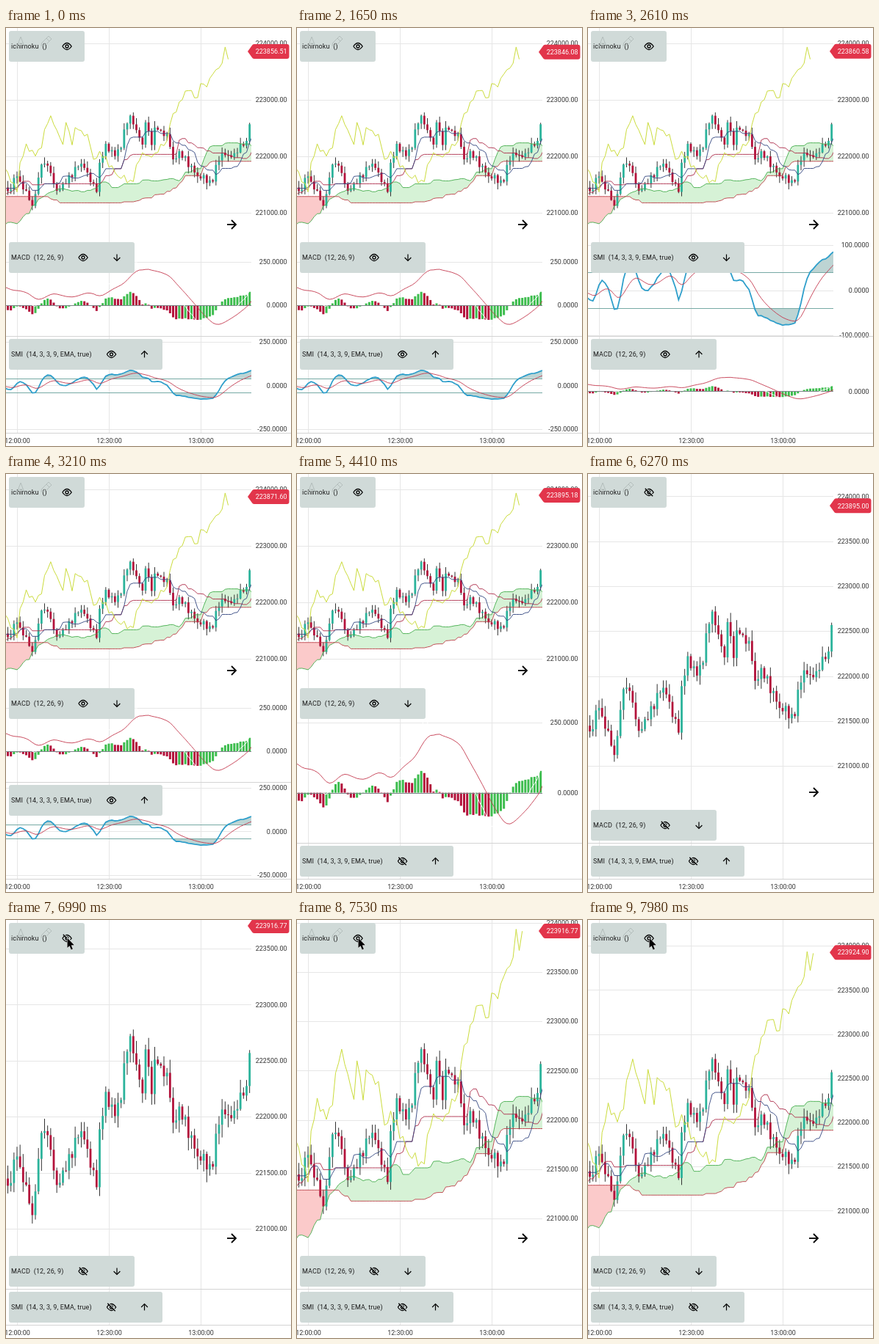
Write an HTML page with a canvas that moves like this. It is 388 px wide and 570 px high and loops after 8 s.

```html
<!DOCTYPE html>
<html lang="en">
<head>
<meta charset="utf-8">
<title>Indicator panes</title>
<style>
html, body { margin: 0; width: 100%; height: 100%; overflow: hidden; background: #fff; }
canvas { display: block; width: 388px; height: 570px; }
</style>
</head>
<body>
<canvas id="chart"></canvas>
<script>
const W = 388, H = 570, LOOP = 8000, RIGHT = 334, AXIS = 552;
const FONT = 'Roboto, "Open Sans", sans-serif';
const cv = document.getElementById('chart');
const c = cv.getContext('2d');
const dpr = window.devicePixelRatio || 1;
cv.width = W * dpr;
cv.height = H * dpr;

// ---------- market: turning points joined by a seeded zigzag ----------
const candleX = i => 2.5 + i * 25 / 6;
const FIRST = -80, LAST = 99, SHIFT = 26;
const TURNS = [
  [-80, 264], [-62, 268], [-58, 330], [-36, 497], [-24, 430], [-15, 294], [-6, 380], [-3, 330],
  [0, 362], [3, 322], [8, 402], [11, 290], [13, 293], [16, 361], [23, 296], [25, 299], [29, 364],
  [30, 285], [32, 234], [35, 267], [37, 245], [38, 195], [40, 158], [44, 236], [45, 176], [47, 237],
  [48, 190], [52, 208], [54, 276], [56, 254], [62, 322], [67, 336], [68, 291], [70, 258], [73, 270],
  [78, 226], [79, 181], [82, 121], [85, 90], [88, 109], [89, 71], [91, 80], [93, 45], [96, 16],
  [97, -28], [98, 5], [99, -25]
];
const PX = .1528;

let seed = 11;
const rnd = () => (seed = seed * 16807 % 2147483647) / 2147483647;

function makeCandles() {
  const list = [];
  let k = 0, open = 222000;
  for (let i = FIRST; i <= LAST; i++) {
    if (i > TURNS[k + 1][0]) k++;
    const [i0, y0] = TURNS[k], [i1, y1] = TURNS[k + 1];
    const jitter = i === i0 || i === i1 ? 0 : (i % 2 ? 1 : -1) * 10 * rnd();
    const y = y0 + (y1 - y0) * (i - i0) / (i1 - i0) + jitter;
    const close = 223000 - (y - 115) / PX;
    const wick = () => (2 + 16 * rnd()) / PX;
    list.push({ i, open, close, high: Math.max(open, close) + wick(), low: Math.min(open, close) - wick() });
    open = close;
  }
  return list;
}
const candles = makeCandles();
const closes = candles.map(k => k.close);
const at = (list, i) => list[Math.min(LAST, i) - FIRST];

// ---------- indicators ----------
const extent = n => candles.map((_, i) => {
  const part = candles.slice(Math.max(0, i - n + 1), i + 1);
  return [Math.max(...part.map(k => k.high)), Math.min(...part.map(k => k.low))];
});
const middle = n => extent(n).map(([hi, lo]) => (hi + lo) / 2);
const ema = (list, n) => {
  let e = list[0];
  return list.map(v => e += (v - e) * 2 / (n + 1));
};
const minus = (a, b) => a.map((v, i) => v - b[i]);
const delay = list => list.map((_, i) => list[Math.max(0, i - SHIFT)]);

const conversion = middle(9), base = middle(26);
const spanA = delay(conversion.map((v, i) => (v + base[i]) / 2));
const spanB = delay(middle(52));

const macd = minus(ema(closes, 12), ema(closes, 26));
const signal = ema(macd, 9);
const histogram = minus(macd, signal);

const smooth = list => ema(ema(list, 3), 3);
const halfRange = smooth(extent(14).map(([hi, lo]) => (hi - lo) / 2));
const smi = smooth(minus(closes, middle(14))).map((v, i) => 100 * v / halfRange[i]);
const smiSignal = ema(smi, 9);

// ---------- motion ----------
// cubic-bezier(0, 0, .58, 1)
const ease = x => {
  if (x <= 0) return 0;
  if (x >= 1) return 1;
  let lo = 0, hi = 1, s = .5;
  for (let n = 0; n < 20; n++) {
    s = (lo + hi) / 2;
    if (1.74 * s * s * (1 - s) + s ** 3 < x) lo = s; else hi = s;
  }
  return s * s * (3 - 2 * s);
};
const tween = (t, start) => ease((t - start) / 300);
const mix = (a, b, k) => a + (b - a) * k;
const mixRange = (a, b, k) => [mix(a[0], b[0], k), mix(a[1], b[1], k)];

const TICKS = [[470, 223858.93], [1345, 223846.08], [2305, 223860.58], [3025, 223874.3],
  [4105, 223895.18], [4930, 223888.4], [5890, 223895], [6690, 223916.77], [7675, 223924.9]];
const priceAt = t => TICKS.reduce((p, [start, v]) => mix(p, v, tween(t, start)), 223856.51);

const RANGE = {
  short: [224272.7, 220532.5], tall: [224293, 220522], zoom: [223755, 220784],
  macdTop: [381.4, -178], smiTop: [113.5, -102], macdLow: [820, -614], smiLow: [282, -270]
};

// ---------- drawing ----------
const pane = (y, h, [top, bot]) => ({
  y, h, top, bot, at: v => y + (top - v) / (top - bot) * h
});

function text(str, x, y, align = 'right', color = '#333', spacing = 0) {
  c.font = '9px ' + FONT;
  c.letterSpacing = spacing + 'px';
  c.textAlign = align;
  c.textBaseline = 'middle';
  c.fillStyle = color;
  c.fillText(str, x, y + .5);
}

function stroke(color, width, pts) {
  c.beginPath();
  pts.forEach(([x, y]) => c.lineTo(x, y));
  c.strokeStyle = color;
  c.lineWidth = width;
  c.stroke();
}

const rule = (y, color, x2 = W) => stroke(color, 1, [[0, Math.round(y) + .5], [x2, Math.round(y) + .5]]);

const path = (p, list, shift = 0, last = 81) => {
  const pts = [];
  for (let i = -2; i <= last; i++) pts.push([candleX(i), p.at(at(list, i + shift))]);
  return pts;
};
const series = (p, list, color, width = .9) => stroke(color, width, path(p, list));

function band(p, upper, lower, color) {
  c.beginPath();
  [...path(p, upper), ...path(p, lower).reverse()].forEach(([x, y]) => c.lineTo(x, y));
  c.fillStyle = color;
  c.fill();
}

function inPane(p, draw) {
  c.save();
  c.beginPath();
  c.rect(0, p.y, RIGHT, p.h);
  c.clip();
  draw(p);
  c.restore();
}

function scale(p, digits) {
  const unit = p.h / (p.top - p.bot);
  const step = [50, 100, 250, 500, 1000].find(s => s * unit >= 58) || 1000;
  for (let v = Math.ceil(p.bot / step) * step; v <= p.top; v += step) {
    const y = p.at(v);
    rule(y, '#e6e6e6', RIGHT);
    text(v.toFixed(digits), 382.5, y);
  }
}

function drawCandles(p) {
  candles.filter(k => k.i > -2 && k.i < 80).forEach(k => {
    const x = candleX(k.i), top = p.at(Math.max(k.open, k.close)), bot = p.at(Math.min(k.open, k.close));
    stroke('#333', 1, [[x, p.at(k.high)], [x, p.at(k.low)]]);
    c.fillStyle = k.close >= k.open ? '#2bb39b' : '#b3123b';
    c.fillRect(x - 1.4, top, 2.8, Math.max(1, bot - top));
  });
}

function drawCloud(p) {
  const high = spanA.map((v, i) => Math.max(v, spanB[i]));
  band(p, high, spanB, '#d6f2d6');
  band(p, high, spanA, '#fbcaca');
}

function drawIchimoku(p, last) {
  series(p, spanA, '#45ad4c');
  series(p, spanB, '#bd4048');
  series(p, base, '#ad2c4a');
  series(p, conversion, '#33467f');
  stroke('#cbdc3c', 1, path(p, closes, SHIFT, last));
}

function drawMacd(p) {
  const zero = p.at(0);
  for (let i = -1; i < 80; i++) {
    const v = at(histogram, i), y = p.at(v);
    c.fillStyle = v >= at(histogram, i - 1) ? '#3dbd4e' : '#b3123b';
    c.fillRect(candleX(i) - 1.5, Math.min(y, zero), 3, Math.abs(y - zero));
  }
  rule(zero, '#7d8589', RIGHT);
  series(p, macd, '#fff', 1);
  series(p, signal, '#c43a50');
}

function drawSmi(p) {
  const flat = v => smi.map(() => v);
  band(p, smi.map(v => Math.max(v, 40)), flat(40), '#bdd4d3');
  band(p, smi.map(v => Math.min(v, -40)), flat(-40), '#bdd4d3');
  [40, -40].forEach(v => rule(p.at(v), '#76a9a4', RIGHT));
  series(p, smi, '#2f9fcb', 1.8);
  series(p, smiSignal, '#c43a50');
}

function eye(x, y, hidden) {
  c.save();
  c.translate(x, y);
  c.strokeStyle = '#000';
  c.lineWidth = 1.3;
  c.beginPath();
  c.moveTo(-6.2, 0);
  c.quadraticCurveTo(0, -9, 6.2, 0);
  c.quadraticCurveTo(0, 9, -6.2, 0);
  c.stroke();
  c.beginPath();
  c.arc(0, 0, 2, 0, 7);
  c.stroke();
  if (hidden) {
    stroke('#d0dad8', 1.3, [[-4, -5.6], [6, 4.4]]);
    stroke('#000', 1.3, [[-5.2, -5.2], [5.2, 5.2]]);
  }
  c.restore();
}

function arrow(x, y, angle, r, width) {
  c.save();
  c.translate(x, y);
  c.rotate(angle);
  stroke('#000', width, [[-r, 0], [r - .5, 0]]);
  stroke('#000', width, [[0, -r], [r, 0], [0, r]]);
  c.restore();
}

function chip(y, width, label, eyeX, hidden) {
  c.fillStyle = '#d0dad8';
  c.beginPath();
  c.roundRect(4, y + 4, width, 42, 3);
  c.fill();
  text(label, 7, y + 25, 'left', '#1c1c1c', .12);
  eye(eyeX, y + 25, hidden);
}

function macdChip(y, dir, hidden) {
  chip(y, 171, 'MACD\u00a0 (12, 26, 9)', 105, hidden);
  arrow(151, y + 25, dir * Math.PI / 2, 4.4, 1.2);
}

function smiChip(y, dir, hidden) {
  chip(y, 209, 'SMI\u00a0 (14, 3, 3, 9, EMA, true)', 143.5, hidden);
  arrow(188.5, y + 25, dir * Math.PI / 2, 4.4, 1.2);
}

function faintTools() {
  const color = '#b4bebc';
  stroke(color, 1, [[15, 25], [20, 12], [25, 25]]);
  stroke(color, 1, [[17, 21], [23, 21]]);
  stroke(color, 1, [[48, 24], [49, 20], [58, 11], [62, 15], [53, 24], [48, 24]]);
  stroke(color, 1, [[55, 14], [59, 18]]);
}

function priceTag(p, price) {
  const y = Math.max(8, p.at(price));
  c.fillStyle = '#e2354b';
  c.beginPath();
  c.moveTo(329, y);
  c.lineTo(335.5, y - 9);
  c.quadraticCurveTo(336.5, y - 10, 338, y - 10);
  c.arcTo(385.5, y - 10, 385.5, y, 3);
  c.arcTo(385.5, y + 10, 338, y + 10, 3);
  c.lineTo(338, y + 10);
  c.quadraticCurveTo(336.5, y + 10, 335.5, y + 9);
  c.fill();
  text(price.toFixed(2), 382.5, y, 'right', '#fff');
}

function cursor(x, y) {
  c.beginPath();
  [[0, 0], [0, 13.5], [3, 10.8], [5.2, 16], [7.4, 15], [5.3, 10], [9.4, 9.7]]
    .forEach(([dx, dy]) => c.lineTo(x + dx, y + dy));
  c.closePath();
  c.fillStyle = '#000';
  c.strokeStyle = '#fff';
  c.lineWidth = 1;
  c.stroke();
  c.fill();
}

function draw(t) {
  const smiOff = t >= 3720, macdOff = t >= 4950, cloudOff = t >= 6256 && t < 7430;
  const swapped = t >= 1735 && t < 2900;
  const swap = t < 2900 ? tween(t, 1725) : 1 - tween(t, 2895);
  const zoom = tween(t, 6256) - tween(t, 7426);
  const split = smiOff ? 503 : 420;

  const main = macdOff ? pane(0, 454, mixRange(RANGE.tall, RANGE.zoom, zoom)) : pane(0, 288, RANGE.short);
  const upper = pane(main.h, split - main.h, mixRange(RANGE.macdTop, RANGE.smiTop, swap));
  const lower = pane(split, AXIS - split, mixRange(RANGE.smiLow, RANGE.macdLow, swap));

  c.setTransform(dpr, 0, 0, dpr, 0, 0);
  c.fillStyle = '#fff';
  c.fillRect(0, 0, W, H);

  ['12:00:00', '12:30:00', '13:00:00'].forEach((label, i) => {
    const x = 15.5 + 125 * i;
    stroke('#e6e6e6', 1, [[x, 0], [x, AXIS]]);
    text(label, x, 563, 'center');
  });

  scale(main, 2);
  inPane(main, p => {
    if (!cloudOff) drawCloud(p);
    drawCandles(p);
    if (!cloudOff) drawIchimoku(p, t > 7000 ? 73 : 72);
  });
  if (!macdOff) {
    scale(upper, 4);
    inPane(upper, swapped ? drawSmi : drawMacd);
  }
  if (!smiOff) {
    scale(lower, 4);
    inPane(lower, swapped ? drawMacd : drawSmi);
  }
  rule(split, '#d3d3d3');
  rule(AXIS, '#d3d3d3');

  chip(0, 103, 'ichimoku\u00a0 ()', 83, cloudOff);
  faintTools();
  if (swapped) {
    smiChip(upper.y, 1, false);
    macdChip(lower.y, -1, false);
  } else {
    macdChip(upper.y, 1, macdOff);
    smiChip(lower.y, -1, smiOff);
  }
  arrow(307, main.h - 20, 0, 6, 1.8);
  priceTag(main, priceAt(t));

  if (t >= 1110 && t < 1170) cursor(150, 314);
  if (t >= 4950 && t < 5370) cursor(104, 313);
  if (t >= 6300) cursor(83.5, 24.5);
}

const begin = performance.now();
function tick() {
  draw((performance.now() - begin) % LOOP);
  requestAnimationFrame(tick);
}
tick();
</script>
</body>
</html>
```
